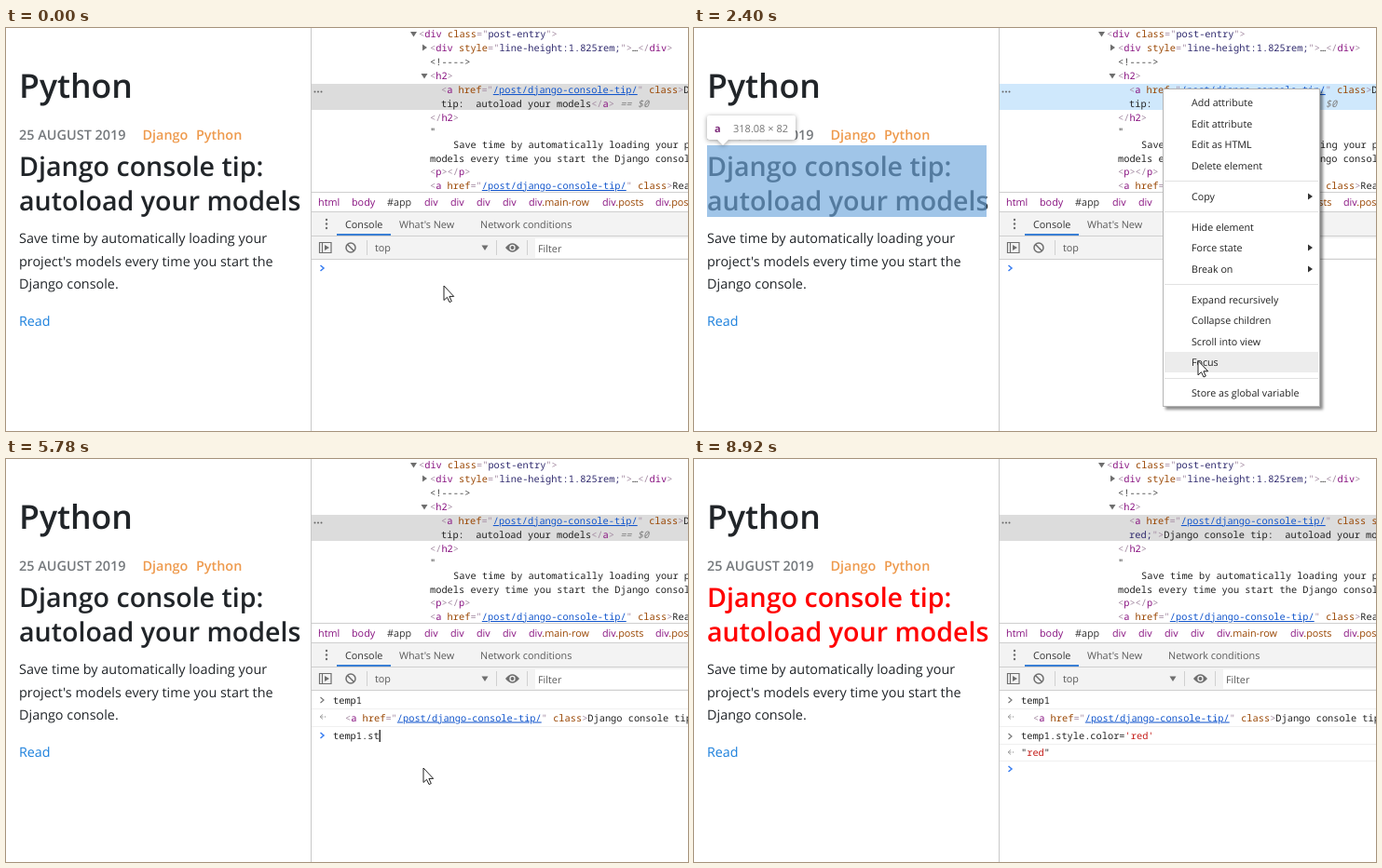
An HTML page for the animation above (9220 ms loop, 732 px wide and 433 px high).

```html
<!DOCTYPE html>
<html lang="en">
<head>
<meta charset="utf-8">
<title>Console demo</title>
<style>
html, body { margin: 0; width: 100%; height: 100%; overflow: hidden; background: #fff; }
svg { display: block; }
text { white-space: pre; text-rendering: geometricPrecision; font-family: "Open Sans", "Noto Sans", sans-serif; fill: #212529; }
.h1 { font-size: 35.6px; font-weight: 600; }
.h2 { font-size: 28.6px; font-weight: 600; }
.body { font-size: 14.4px; }
.date { font-size: 14.45px; font-weight: 600; fill: #75797d; }
.tag { font-size: 14.4px; font-weight: 600; fill: #ee9a4d; }
.link { font-size: 14.3px; fill: #1a7fdc; }
.ui { font-size: 10.8px; fill: #5a5a5a; }
.dark { fill: #333; }
.crumb { fill: #881280; }
.item { font-size: 10.7px; fill: #222; }
.size { font-size: 11px; fill: #777; text-anchor: end; }
.name { font-size: 11px; font-weight: 700; fill: #7d2a7a; }
.code { font-family: "Noto Sans Mono", "DejaVu Sans Mono", monospace; font-size: 10.33px; fill: #222; }
.b { fill: #a48ba2; } .t { fill: #881280; } .n { fill: #994500; } .v { fill: #2f2a6e; }
.u { fill: #1155cc; text-decoration: underline; }
.g { fill: #444; } .s { fill: #c41a16; } .d { fill: #808080; font-style: italic; }
.menu { filter: drop-shadow(3px 3px 1.5px rgba(0,0,0,.45)); }
.tip { filter: drop-shadow(0 1px 2.5px rgba(0,0,0,.4)); }
</style>
</head>
<body>
<script>
const LOOP = 9220, STEP = 70;

const esc = s => s.replace(/&/g, '&amp;').replace(/</g, '&lt;').replace(/>/g, '&gt;');
const c = (cls, s) => `<tspan class="${cls}">${esc(s)}</tspan>`;
const attr = (name, val, cls = 'v') => ' ' + c('n', name) + c('b', '="') + c(cls, val) + c('b', '"');
const open = (name, attrs = '') => c('b', '<') + c('t', name) + attrs + c('b', '>');
const close = name => c('b', '</') + c('t', name) + c('b', '>');
const text = (x, y, cls, html) => `<text x="${x}" y="${y}" class="${cls}">${html}</text>`;
const code = (x, y, html) => text(x, y, 'code', html);
const rect = (x, y, w, h, fill, more = '') => `<rect x="${x}" y="${y}" width="${w}" height="${h}" fill="${fill}" ${more}/>`;
const path = (d, fill, more = '') => `<path d="${d}" fill="${fill}" ${more}/>`;
const line = (d, color, w = 1) => path(d, 'none', `stroke="${color}" stroke-width="${w}"`);
const dot = (x, y, r, fill) => `<circle cx="${x}" cy="${y}" r="${r}" fill="${fill}"/>`;
const group = (id, html) => `<g id="${id}">${html}</g>`;
const down = (x, y) => path(`M${x} ${y}h7l-3.5 5.5z`, '#6e6e6e');
const right = (x, y, fill = '#6e6e6e') => path(`M${x} ${y}v7l5 -3.5z`, fill);

const href = attr('href', '/post/django-console-tip/', 'u') + ' ' + c('n', 'class');
const anchor = open('a', href);
const title = 'Django console tip:  autoload your models';

function page() {
  return text(14, 74.5, 'h1', 'Python')
    + text(14, 120, 'date', '25 AUGUST 2019')
    + text(146.5, 120, 'tag', 'Django') + text(204, 120, 'tag', 'Python')
    + group('title', text(14, 159, 'h2', 'Django console tip:') + text(14, 195.5, 'h2', 'autoload your models'))
    + text(14, 231, 'body', 'Save time by automatically loading your')
    + text(14, 255.5, 'body', "project's models every time you start the")
    + text(14, 280, 'body', 'Django console.')
    + text(14, 319.5, 'link', 'Read');
}

function tooltip(y, name, size) {
  return path(`M16 ${y}h91q2 0 2 2v22q0 2 -2 2h-70l-6 6l-6 -6h-9q-2 0 -2 -2v-22q0 -2 2 -2z`, '#fff', 'class="tip"')
    + text(22, y + 17.5, 'name', name) + text(101, y + 17.5, 'size', size);
}

function elements() {
  return rect(328, 0, 404, 177, '#fff')
    + rect(328, 60, 404, 28, '#dcdcdc', 'id="selected"')
    + rect(331, 148, 410, 13, '#e9f1fc', 'id="rowP" rx="5"')
    + [331.5, 335, 338.5].map(x => dot(x, 68.5, 1, '#666')).join('')
    + down(434, 4) + right(447, 17.5) + down(445.5, 49)
    + code(443, 10, open('div', attr('class', 'post-entry')))
    + code(455, 25, open('div', attr('style', 'line-height:1.825rem;')) + '…' + close('div'))
    + code(455, 40, c('g', '<!---->'))
    + code(455, 55, open('h2'))
    + group('plain', code(467, 70, anchor + 'Django console')
      + code(467, 84.5, 'tip:  autoload your models' + close('a') + c('d', ' == $0')))
    + group('styled', code(467, 70, c('b', '<') + c('t', 'a') + href + attr('style', 'color:'))
      + code(467, 84.5, c('v', 'red;') + c('b', '">') + title)
      + rect(467, 74, 24, 14, '#d5a6d6', 'id="flash"'))
    + code(455, 100, close('h2'))
    + code(455, 114.5, '"')
    + code(480, 129, "Save time by automatically loading your project's")
    + code(455, 143.5, 'models every time you start the Django console.')
    + code(455, 158, open('p') + close('p'))
    + code(455, 173, anchor + 'Read' + close('a'));
}

function crumb(x, name) {
  if (name[0] === '#') return text(x, 191, 'ui dark', name);
  const [tag, cls] = name.split('.');
  return text(x, 191, 'ui crumb', tag + (cls ? c('n', '.' + cls) : ''));
}

function drawer() {
  const crumbs = [[335, 'html'], [371, 'body'], [409, '#app'], [449, 'div'], [477, 'div'], [505, 'div'],
    [533, 'div'], [561, 'div.main-row'], [640, 'div.posts'], [697, 'div.post-entry']];
  return rect(328, 176, 404, 22, '#fff') + line('M328 176.5H732M328 197.5H732', '#cfcfcf')
    + crumbs.map(p => crumb(...p)).join('')
    + rect(328, 198, 404, 51, '#f3f3f3') + line('M328 223.5H732M328 248.5H732', '#cfcfcf')
    + [206, 210.5, 215].map(y => dot(344, y, 1.2, '#6e6e6e')).join('')
    + text(364, 214.5, 'ui dark', 'Console') + text(422, 214.5, 'ui', "What's New")
    + text(509, 214.5, 'ui', 'Network conditions')
    + rect(355, 221, 58, 2, '#3a7fd5')
    + line('M336.5 230.5h12.5v11h-12.5zM339.5 230.5v11', '#6e6e6e', 1.2) + path('M342 233v6l5 -3z', '#6e6e6e')
    + '<circle cx="370" cy="236" r="5" fill="none" stroke="#6e6e6e" stroke-width="1.5"/>'
    + line('M366.5 232.5l7 7', '#6e6e6e', 1.5)
    + line('M387.5 228V244M526.5 228V244M559.5 228V244', '#d0d0d0')
    + text(396, 240, 'ui', 'top') + down(510.5, 233.5)
    + path('M536 236q7.5 -9.5 15 0q-7.5 9.5 -15 0z', '#6e6e6e')
    + dot(543.5, 236, 3.2, '#f3f3f3') + dot(543.5, 236, 1.9, '#6e6e6e')
    + rect(568, 226, 164, 21, '#fff') + text(571, 240.5, 'ui', 'Filter');
}

const chevron = (y, color, w = 1.2) => line(`M337.5 ${y - 3}l3.5 3l-3.5 3`, color, w);
const reply = y => line(`M340 ${y - 2.5}l-3 2.5l3 2.5M338 ${y}h2.5`, '#a0a0a0') + dot(342.5, y, 0.7, '#a0a0a0');

function consoleView() {
  const rule = y => line(`M328 ${y}H732`, '#f0f0f0');
  const first = rect(328, 269, 404, 18, '#e9f1fc', 'id="rowA"')
    + chevron(259, '#777') + code(351, 262.5, 'temp1') + rule(268.5)
    + reply(277) + code(364, 281.5, anchor + title) + rule(287.5);
  const second = chevron(298, '#777') + code(351, 301, 'temp1.style.color=' + c('s', "'red'")) + rule(306.5)
    + reply(315) + code(351, 319, '"' + c('s', 'red') + '"') + rule(324.5);
  return rect(328, 249, 404, 184, '#fff') + group('first', first) + group('second', second)
    + group('prompt', chevron(0, '#367cf1', 1.5) + code(351, 4, '<tspan id="typed"></tspan>')
      + rect(351, -6, 1.2, 13, '#000', 'id="caret"'));
}

const items = [[80, 'Add attribute'], [103, 'Edit attribute'], [125, 'Edit as HTML'], [148, 'Delete element'],
  [181, 'Copy', 1], [214, 'Hide element'], [236, 'Force state', 1], [259, 'Break on', 1],
  [292, 'Expand recursively'], [314, 'Collapse children'], [337, 'Scroll into view'], [359, 'Focus'],
  [392, 'Store as global variable']];

function menu() {
  return rect(503.5, 65.5, 168, 341, '#fff', 'stroke="#b4b4b4" class="menu"')
    + rect(505, 0, 165, 22, '#ececec', 'id="pick"')
    + line('M505 164.5H670M505 197.5H670M505 275.5H670M505 376.5H670', '#e2e2e2')
    + items.map(([y, s, sub]) => text(534, y + 4, 'item', s) + (sub ? right(659, y - 3.5, '#333') : '')).join('');
}

document.body.innerHTML = `<svg width="732" height="433" viewBox="0 0 732 433">
  ${rect(0, 0, 732, 433, '#fff')}${page()}
  ${group('boxP', rect(14, 287, 305, 15, '#f7c99d') + tooltip(254, 'p', '322.95 × 0'))}
  ${group('boxA', rect(14, 126, 300, 77, '#6fa8dc', 'opacity=".66"') + tooltip(94, 'a', '318.08 × 82'))}
  ${elements()}${drawer()}${consoleView()}${line('M327.5 0V433', '#c8c8c8')}
  ${group('menu', menu())}
  ${group('arrow', path('M0 0V15.5L3.5 12.3L6 17.6L8.3 16.6L5.9 11.4H10.7Z', '#fff', 'stroke="#222"'))}
  ${group('beam', line('M-3 -7.5H-1L0 -6.5L1 -7.5H3M0 -6.5V6.5M-3 7.5H-1L0 6.5L1 7.5H3', '#222', 1.2))}
</svg>`;

const el = id => document.getElementById(id);
const show = (id, on) => { el(id).style.display = on ? '' : 'none'; };
const move = (id, x, y) => el(id).setAttribute('transform', `translate(${x} ${y})`);
const within = (t, a, b) => t >= a && t < b;

// time, x, y of the pointer
const route = [
  [390, 470, 277], [530, 458, 218], [670, 449, 144], [810, 466, 92], [1160, 503, 66],
  [1550, 503, 66], [1620, 505, 72], [1770, 507, 81], [2120, 525, 235], [2470, 545, 388],
  [3010, 545, 388], [3290, 481, 326], [3500, 456, 284], [3850, 452, 278],
  [4010, 452, 278], [4430, 444, 315], [4570, 448, 332], [7450, 448, 332], [8150, 468, 440]
];

function pointer(t) {
  const i = route.findIndex(p => p[0] > t);
  if (i === 0) return route[0].slice(1);
  if (i < 0) return route[route.length - 1].slice(1);
  const [ta, xa, ya] = route[i - 1], [tb, xb, yb] = route[i];
  const k = Math.floor((t - ta) / STEP) * STEP / (tb - ta);
  return [xa + (xb - xa) * k, ya + (yb - ya) * k];
}

// time, number of typed characters
const command = "temp1.style.color='red'";
const keys = [[5100, 1], [5250, 5], [5480, 6], [5710, 7], [5780, 8], [5850, 9], [6160, 12],
  [6310, 13], [6460, 17], [6530, 18], [6600, 19], [6670, 21], [6740, 23]];
const QUOTE = command.indexOf("'");
const STORED = 2770, ENTER = 6810;

function draw(t) {
  const [x, y] = pointer(t);
  const stored = t >= STORED, done = t >= ENTER;
  const hoverP = within(t, 670, 810), hoverA = within(t, 810, 2700), hoverRow = within(t, 3500, 4220);

  show('boxP', hoverP);
  show('rowP', hoverP);
  show('boxA', hoverA || hoverRow);
  show('rowA', hoverRow);
  el('selected').setAttribute('fill', hoverA ? '#cfe8fc' : '#dcdcdc');

  const item = items.find(p => Math.abs(p[0] - y) <= 11);
  show('menu', within(t, 1470, 2700));
  show('pick', item);
  if (item) el('pick').setAttribute('y', item[0] - 11);

  show('first', stored);
  show('second', done);
  show('plain', !done);
  show('styled', done);
  for (const h of el('title').children) h.style.fill = done ? '#f00' : '';
  const fade = Math.floor((t - 6880) / STEP) * STEP / 630;
  el('flash').setAttribute('opacity', Math.max(0, Math.min(1, 1 - fade)));

  const last = keys.filter(k => k[0] <= t).pop();
  const typed = last && !done ? command.slice(0, last[1]) : '';
  el('typed').innerHTML = esc(typed.slice(0, QUOTE)) + c('s', typed.slice(QUOTE));
  move('prompt', 0, done ? 333 : stored ? 297 : 258);
  show('caret', within(t, 4720, 7850) || within(t, 8380, 8920));
  el('caret').setAttribute('x', 351 + typed.length * 6.2);

  const beam = done && Math.abs(y - 332) < 12;
  show('beam', beam);
  show('arrow', !beam);
  move(beam ? 'beam' : 'arrow', x, y);
}

function tick() {
  draw(performance.now() % LOOP);
  requestAnimationFrame(tick);
}
tick();
</script>
</body>
</html>
```
